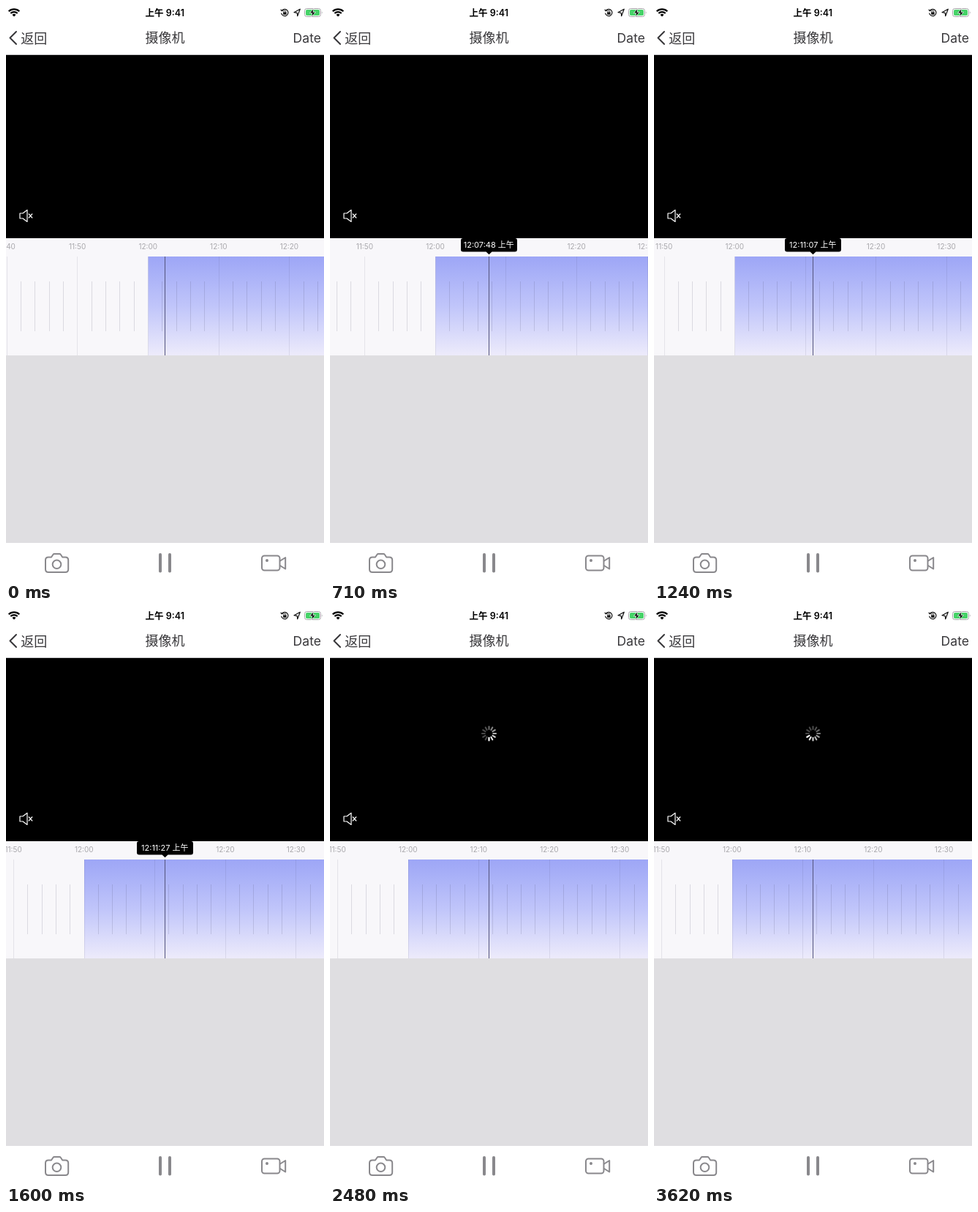
Write an HTML page that moves like this. It is 435x785 px and loops after 3.72 s.

```html
<!DOCTYPE html>
<html lang="zh-CN">
<head>
<meta charset="utf-8">
<title>摄像机</title>
<style>
  html, body { margin: 0; width: 100%; height: 100%; overflow: hidden; background: #fff; }
  svg { display: block; width: 435px; height: 785px; }
  text { font-family: Inter, "Noto Sans CJK SC", "Noto Sans CJK", sans-serif; }
  .line { fill: none; stroke-linecap: round; stroke-linejoin: round; }
  .nav { font-size: 18px; fill: #39383b; }
  .tool { stroke: #89888c; stroke-width: 2; }
  .mid { text-anchor: middle; }
  #labels text { font-size: 10px; fill: #a9a8ac; text-anchor: middle; }
  #ticks { stroke: #3c3c5a; stroke-width: 1; shape-rendering: crispEdges; }
</style>
</head>
<body>
<svg viewBox="0 0 435 785" xmlns="http://www.w3.org/2000/svg">
  <defs>
    <linearGradient id="blue" x1="0" y1="0" x2="0" y2="1">
      <stop offset="0" stop-color="#9da6f6"/>
      <stop offset=".5" stop-color="#c0c5fa"/>
      <stop offset="1" stop-color="#edebfb"/>
    </linearGradient>
  </defs>
  <rect width="435" height="785" fill="#fff"/>

  <!-- status bar -->
  <g class="line" stroke="#000" stroke-width="2.2" style="stroke-linecap:butt">
    <path d="M3.7 7.3a10.4 10.4 0 0 1 14.6 0M6.3 10a6.7 6.7 0 0 1 9.4 0"/>
  </g>
  <path d="M11 14.6l-2.5-2.6a3.6 3.6 0 0 1 5 0z"/>
  <text class="mid" x="217.3" y="13.7" font-size="12.5" font-weight="600">上午 9:41</text>
  <g class="line" stroke="#111" stroke-width="1.2">
    <path d="M377.6 6a4.7 4.7 0 1 1-.9 4.2M376 5.2l1.4 1.6 1.8-1"/>
    <path d="M380 8.6v-1a1.4 1.4 0 0 1 2.8 0v1" stroke-width=".9"/>
    <path d="M402.3 4.2L394 8.7l4.2.6.5 4.4z"/>
  </g>
  <rect x="379.2" y="8.4" width="4.4" height="3.4" rx=".5"/>
  <rect x="408.5" y="3.5" width="22" height="11" rx="3" fill="none" stroke="#a5a5a7"/>
  <rect x="410" y="5" width="19" height="8" rx="1.8" fill="#45d267"/>
  <path d="M432 7.2q1.6 1.8 0 3.6z" fill="#a5a5a7"/>
  <path d="M420.9 3.2l-5.4 6.5h3.3l-1 5.2 5.6-6.6h-3.4z" stroke="#fff" stroke-width=".7"/>

  <!-- navigation -->
  <path class="line" d="M14 35L5.5 43.5 14 52" stroke="#39383b" stroke-width="2"/>
  <text class="nav" x="20.3" y="50.7">返回</text>
  <text class="nav mid" x="217.5" y="50">摄像机</text>
  <text class="nav" x="431" y="50" text-anchor="end" style="font-size:17.6px">Date</text>
  <rect y="66" width="435" height="1" fill="#c9c9cb"/>

  <!-- video -->
  <rect y="67" width="435" height="250"/>
  <path class="line" d="M19 283h4l6-4.5v16l-6-4.5h-4zM31.2 284l4.6 5M35.8 284l-4.6 5" stroke="#fff" stroke-width="1.2"/>
  <g id="spinner" class="line" stroke="#fff" stroke-width="2.2" transform="translate(217.5 170)"></g>

  <!-- timeline -->
  <rect y="317" width="435" height="160" fill="#f8f7fa"/>
  <g id="track">
    <rect y="342" width="700" height="135" fill="url(#blue)"/>
    <g id="ticks"></g>
    <g id="labels"></g>
  </g>
  <rect x="217" y="342" width="1" height="135" fill="#55557c"/>
  <g id="tip">
    <path d="M182 317h71a3 3 0 0 1 3 3v12.500a3 3 0 0 1-3 3h-31.500l-4 3.700-4-3.700h-31.500a3 3 0 0 1-3-3v-12.500a3 3 0 0 1 3-3z"/>
    <text id="time" class="mid" x="217.3" y="330.300" font-size="11" fill="#fff"></text>
  </g>

  <!-- lower part -->
  <rect y="477" width="435" height="256" fill="#dfdee1"/>
  <g class="line tool">
    <path d="M58 752.500h4l2.300-3.500q.6-1 1.800-1h7q1.200 0 1.800 1l2.300 3.500h4q4 0 4 4v12.500q0 4-4 4h-23.200q-4 0-4-4v-12.500q0-4 4-4z"/>
    <circle cx="69.500" cy="762.300" r="5.800"/>
    <rect x="350" y="750.500" width="24.500" height="20" rx="3.500"/>
    <path d="M375 757.500l7.200-4.500v15.500l-7.200-4.500"/>
  </g>
  <circle cx="357" cy="757" r="2" fill="#89888c"/>
  <g fill="#89888c">
    <rect x="209" y="747" width="4" height="26.500" rx="1.800"/>
    <rect x="222" y="747" width="4" height="26.500" rx="1.800"/>
  </g>
</svg>
<script>
const LOOP = 3720, START = 438, STEP = 88.33, STOP = 1760;
const PX_PER_MIN = 9.66, NEEDLE = 217.5, REST = 194.5;

// time, position of 12:00, speed in px/ms, seconds the readout runs ahead
const KEYS = [
  [438, 183, -0.14, 21],
  [530, 169.5, -0.16, 21],
  [880, 125.5, -0.08, 6],
  [1240, 110.5, -0.018, 3],
  [1600, 107, 0, 1]
];

const $ = id => document.getElementById(id);
const pad = n => String(n).padStart(2, '0');

function add(parent, name, attrs, text = '') {
  const el = document.createElementNS('http://www.w3.org/2000/svg', name);
  for (const key in attrs) el.setAttribute(key, attrs[key]);
  el.textContent = text;
  parent.append(el);
  return el;
}

for (let m = -30; m <= 50; m += 2) {
  const x = m * PX_PER_MIN, major = m % 10 === 0;
  const [y1, y2] = major ? [342, 477] : [376, 444];
  add($('ticks'), 'line', { x1: x, x2: x, y1, y2, opacity: major ? 0.1 : 0.15 });
  if (major) {
    const min = 720 + m;
    add($('labels'), 'text', { x: x - 0.3, y: 332 }, `${Math.floor(min / 60)}:${pad(min % 60)}`);
  }
}

const spokes = Array.from({ length: 12 }, (_, i) =>
  add($('spinner'), 'line', { y1: -5.8, y2: -9.5, transform: `rotate(${i * 30})` }));

// cubic Hermite between neighbouring keys
function scrollAt(t) {
  if (t < START) return { x: REST, lead: 0 };
  const last = KEYS[KEYS.length - 1];
  if (t >= last[0]) return { x: last[1], lead: last[3] };
  const i = KEYS.findIndex(k => k[0] > t) - 1;
  const [t0, x0, v0, l0] = KEYS[i], [t1, x1, v1, l1] = KEYS[i + 1];
  const d = t1 - t0, u = (t - t0) / d, w = 1 - u;
  return {
    x: w * w * (1 + 2 * u) * x0 + u * u * (3 - 2 * u) * x1 + d * u * w * (w * v0 - u * v1),
    lead: l0 + (l1 - l0) * u
  };
}

function draw(now) {
  let t = now % LOOP;
  // the screen is refreshed at a steady low rate
  if (t >= START) t = START + Math.floor((t - START) / STEP) * STEP;

  const { x, lead } = scrollAt(t);
  $('track').setAttribute('transform', `translate(${x.toFixed(2)} 0)`);

  const dragging = t >= START && t < STOP;
  $('tip').style.display = dragging ? '' : 'none';
  if (dragging) {
    const sec = Math.round((NEEDLE - x) / PX_PER_MIN * 60 + lead);
    $('time').textContent = `12:${pad(Math.floor(sec / 60))}:${pad(sec % 60)} 上午`;
  }

  const loading = t >= STOP;
  $('spinner').style.display = loading ? '' : 'none';
  if (loading) {
    const head = Math.floor((t - 938) / (1000 / 12));
    spokes.forEach((s, i) => {
      const age = (head - i + 24) % 12;
      s.setAttribute('opacity', Math.max(0.28, 1 - age * 0.1));
    });
  }
}

const begin = performance.now();
function tick() {
  draw(performance.now() - begin);
  requestAnimationFrame(tick);
}
tick();
</script>
</body>
</html>
```
